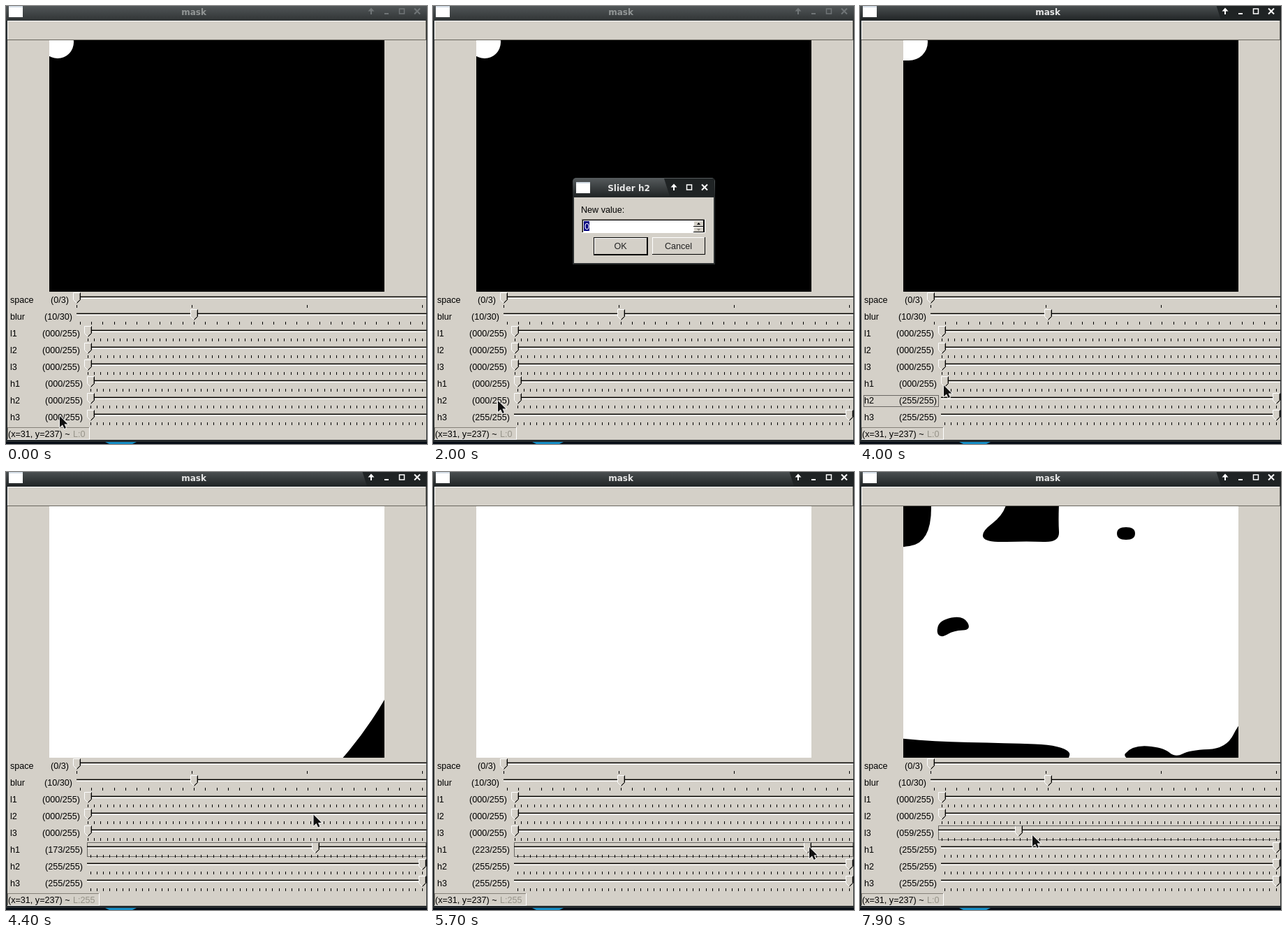
An HTML page with a canvas that plays this animation: 603x627 px, repeating every 8 s.

```html
<!DOCTYPE html>
<html lang="en">
<head>
<meta charset="utf-8">
<title>mask</title>
<style>
html, body { margin: 0; width: 100%; height: 100%; overflow: hidden; background: #0b0f14; }
canvas { display: block; }
</style>
</head>
<body>
<canvas id="stage" width="603" height="627"></canvas>
<script>
const c = document.getElementById('stage').getContext('2d');
const FACE = '#d4d0c8', SHADE = '#848078';
const UI = '12.6px "Liberation Sans", Arial, sans-serif';
const TITLE = 'bold 12px "DejaVu Sans", sans-serif';

// Keyframes: [time, value...]
const POINTER = [[1000, 77, 587], [1800, 93, 565], [3000, 93, 565], [4000, 120, 543],
  [4100, 121, 540], [4500, 547, 474], [5000, 493, 489], [5200, 556, 523], [5700, 539, 537],
  [6300, 591, 544], [6700, 139, 547], [7000, 115, 517], [7400, 117, 515], [7900, 247, 520]];
const H1 = [[4100, 0], [4500, 231], [5400, 231], [5700, 223], [6300, 255]];
const L3 = [[7400, 0], [7900, 59]];

// Control points of the smooth dark areas; the first pair is where each grows from
const BLOBS = [
  [62,49, 0,0, 102,0, 102,102, 40,110, 0,115],
  [240,49, 230,20, 286,20, 284,70, 286,101, 240,99, 180,101, 173,86, 205,62, 214,30],
  [381,88, 368,79, 394,79, 394,97, 368,97],
  [133,219, 109,231, 114,212, 148,205, 160,226, 134,227, 118,237],
  [62,409, 0,375, 100,386, 210,388, 290,391, 308,411, 200,480, 0,480],
  [542,409, 370,415, 390,391, 434,394, 452,409, 472,398, 525,396, 545,355, 600,300, 600,480]
];

function at(t, keys) {
  const i = keys.findIndex(k => t <= k[0]);
  if (i < 1) return keys.at(i).slice(1);
  const a = keys[i - 1], b = keys[i], k = (t - a[0]) / (b[0] - a[0]);
  return a.slice(1).map((v, j) => v + (b[j + 1] - v) * k);
}

function box(x, y, w, h, color) {
  c.fillStyle = color;
  c.fillRect(x, y, w, h);
}

function text(s, x, y, color = '#000', font = UI, align = 'left') {
  c.font = font;
  c.textAlign = align;
  c.fillStyle = color;
  c.fillText(s, x, y);
}

function trace(pts) {
  c.beginPath();
  for (let i = 0; i < pts.length; i += 2) c.lineTo(pts[i], pts[i + 1]);
}

function poly(pts, color) {
  trace(pts);
  c.fillStyle = color;
  c.fill();
}

function line(color, width, ...pts) {
  trace(pts);
  c.strokeStyle = color;
  c.lineWidth = width;
  c.stroke();
}

function bevel(x, y, w, h, light = '#fff', dark = '#000', face = FACE) {
  box(x, y, w, h, dark);
  box(x, y, w - 1, h - 1, light);
  box(x + 1, y + 1, w - 2, h - 2, face);
}

function dotted(x, y, w, h) {
  c.setLineDash([1, 1]);
  c.lineWidth = 1;
  c.strokeStyle = '#000';
  c.strokeRect(x + .5, y + .5, w - 1, h - 1);
  c.setLineDash([]);
}

// Closed curve through the midpoints of its control polygon
function blob([ax, ay, ...pts], scale) {
  const n = pts.length / 2;
  const p = i => [ax + (pts[i % n * 2] - ax) * scale, ay + (pts[i % n * 2 + 1] - ay) * scale];
  c.beginPath();
  for (let i = 0; i <= n; i++) {
    const [x, y] = p(i), [u, v] = p(i + 1), mid = [(x + u) / 2, (y + v) / 2];
    if (i) c.quadraticCurveTo(x, y, ...mid);
    else c.moveTo(...mid);
  }
  c.fillStyle = '#000';
  c.fill();
}

const ICONS = {
  up(x, y, color) {
    line(color, 2, x, y + 4.5, x, y - 2);
    poly([x - 4.5, y, x, y - 5, x + 4.5, y], color);
  },
  min(x, y, color) { box(x - 3, y + 2.5, 6, 2, color); },
  max(x, y, color) {
    c.strokeStyle = color;
    c.lineWidth = 1.5;
    c.strokeRect(x - 3.5, y - 3.5, 7, 7);
  },
  close(x, y, color) {
    line(color, 2, x - 4, y - 4, x + 4, y + 4);
    line(color, 2, x + 4, y - 4, x - 4, y + 4);
  }
};

function titleBar(x, y, w, name, mid, active, icons) {
  const g = c.createLinearGradient(0, y, 0, y + 27);
  g.addColorStop(0, active ? '#565b5d' : '#5b6062');
  g.addColorStop(1, active ? '#202425' : '#303435');
  c.fillStyle = g;
  c.beginPath();
  c.roundRect(x, y, w, 27, [5, 5, 0, 0]);
  c.fill();
  if (active) {
    const left = x + w - icons.length * 22 - 7, right = x + w - 1;
    poly([left, y + 1, right, y + 1, right, y + 26, left + 8, y + 26], '#1f2324');
  }
  box(x + 5, y + 6, 20, 16, '#fff');
  box(x + 5, y + 6, 20, 2, '#d3dce5');
  text(name, mid, y + 18.5, active ? '#e8e8e8' : '#929696', TITLE, 'center');
  icons.forEach((icon, i) => ICONS[icon](
    x + w - 15 - (icons.length - 1 - i) * 22, y + 13.5, active ? '#fff' : '#707577'));
}

function slider(row, name, value, max, steps, textX, start, first) {
  const y = 415 + row * 24, span = 596 - first;
  text(name, 6, y + 10);
  text(`(${String(value).padStart(max > 99 ? 3 : 1, '0')}/${max})`, textX, y + 10);
  // sunken groove, outer and inner edge
  [SHADE, '#000', FACE, '#fff'].forEach((color, i) => box(start, y + i, 602 - start, 1, color));
  for (let i = 0; i <= steps; i++)
    box(Math.floor(first + span * i / steps), y + 13, 1, 4, '#000');
  const x = Math.floor(first + span * value / max) + .5, top = y - 4.5;
  poly([x - 5, top, x + 5, top, x + 5, y + 6, x, y + 11, x - 5, y + 6], FACE);
  line('#fff', 1, x, y + 10.5, x - 5, y + 5.5, x - 5, top, x + 5, top);
  line(SHADE, 1, x + 4, top + 1, x + 4, y + 5.5, x, y + 9.5);
  line('#000', 1, x + 5, top, x + 5, y + 5.5, x, y + 10.5);
}

function mask(h1, h2, l3) {
  c.save();
  c.beginPath();
  c.rect(62, 49, 480, 360);
  c.clip();
  box(62, 49, 480, 360, '#000');
  const grow = h2 ? 4 : 0;
  c.beginPath();
  c.ellipse(74 - grow, 52, 23 + grow + h1 * 3, 23 + grow * .75 + h1 * 3, 0, 0, 7);
  c.rect(62, 49, 10, 23 + grow * 1.5);
  c.fillStyle = '#fff';
  c.fill();
  if (l3) BLOBS.forEach(b => blob(b, l3 / 59));
  c.restore();
}

function dialog(name, entry) {
  const fresh = entry === '0';
  titleBar(200, 246, 204, `Slider ${name}`, 280.5, true, ['up', 'max', 'close']);
  box(200, 273, 204, 97, '#2a2e2f');
  box(202, 274, 200, 94, FACE);
  text('New value:', 212, 296);
  bevel(213, 305, 177, 20, SHADE, '#fff', '#000');
  box(215, 307, 158, 17, '#fff');
  bevel(373, 307, 15, 9);
  bevel(373, 316, 15, 8);
  poly([378, 313, 380.5, 310, 383, 313], '#000');
  poly([378, 319, 383, 319, 380.5, 322], fresh ? SHADE : '#000');
  box(217 + (fresh ? -1 : entry.length * 7), 308, fresh ? 8 : 1, 14, fresh ? '#000080' : '#000');
  text(entry, 217, 319.5, fresh ? '#fff' : '#000');
  box(230, 331, 78, 26, '#000');
  bevel(231, 332, 76, 24);
  bevel(314, 331, 76, 25);
  text('OK', 268.5, 348, '#222', UI, 'center');
  text('Cancel', 351.5, 348, '#222', UI, 'center');
}

function pointer(x, y) {
  c.save();
  c.translate(x, y);
  const arrow = [0,0, 0,16, 4,12.5, 6.5,18, 9,17, 6.5,11.5, 11.5,11.5, 0,0];
  line('#fff', 1.6, ...arrow);
  poly(arrow, '#111');
  c.restore();
}

function draw(t) {
  const h1 = Math.round(at(t, H1)[0]), l3 = Math.round(at(t, L3)[0]);
  const h2 = t >= 3100 ? 255 : 0, h3 = t >= 1100 ? 255 : 0;
  const first = t >= 400 && t < 1000, second = t >= 2000 && t < 3000;
  const active = !(t < 300 || first || t >= 1900 && t < 3000);

  box(0, 0, 603, 627, '#262b2d');
  box(0, 624, 603, 3, '#070d16');
  poly([142, 624, 187, 624, 181, 627, 148, 627], '#148cc4');
  titleBar(-1, -6, 605, 'mask', 269, active, ['up', 'min', 'max', 'close']);
  box(2, 21, 600, 600, FACE);
  bevel(2, 21, 600, 28, '#fff', '#69665f');
  mask(h1, h2, l3);

  slider(0, 'space', 0, 3, 3, 64, 97, 101);
  slider(1, 'blur', 10, 30, 30, 55, 101, 106);
  [0, 0, l3].forEach((v, i) => slider(2 + i, `l${i + 1}`, v, 255, 51, 52, 112, 117));
  [h1, h2, h3].forEach((v, i) => slider(5 + i, `h${i + 1}`, v, 255, 51, 56, 116, 121));

  // keyboard focus
  if (t >= 7500) dotted(112, 506, 490, 21);
  else if (t >= 4100) dotted(116, 530, 486, 21);
  else if (t >= 3100) dotted(5, 557, 108, 17);
  else if (t >= 1100 && t < 1900) dotted(5, 581, 108, 17);

  const lit = h1 > 60 && l3 < 30;
  bevel(2, 603, lit ? 132 : 118, 18, SHADE, '#fff');
  text('(x=31, y=237) ~ ', 3, 617);
  text(lit ? 'L:255' : 'L:0', 96, 617, '#969389');

  if (first) dialog('h3', t < 500 ? '0' : t < 700 ? '2' : t < 800 ? '25' : '255');
  if (second) dialog('h2', t < 2300 ? '0' : t < 2600 ? '2' : '255');
  pointer(...at(t, POINTER));
}

function tick() {
  draw(Math.floor(performance.now() % 8000 / 100) * 100);
  requestAnimationFrame(tick);
}
tick();
</script>
</body>
</html>
```
